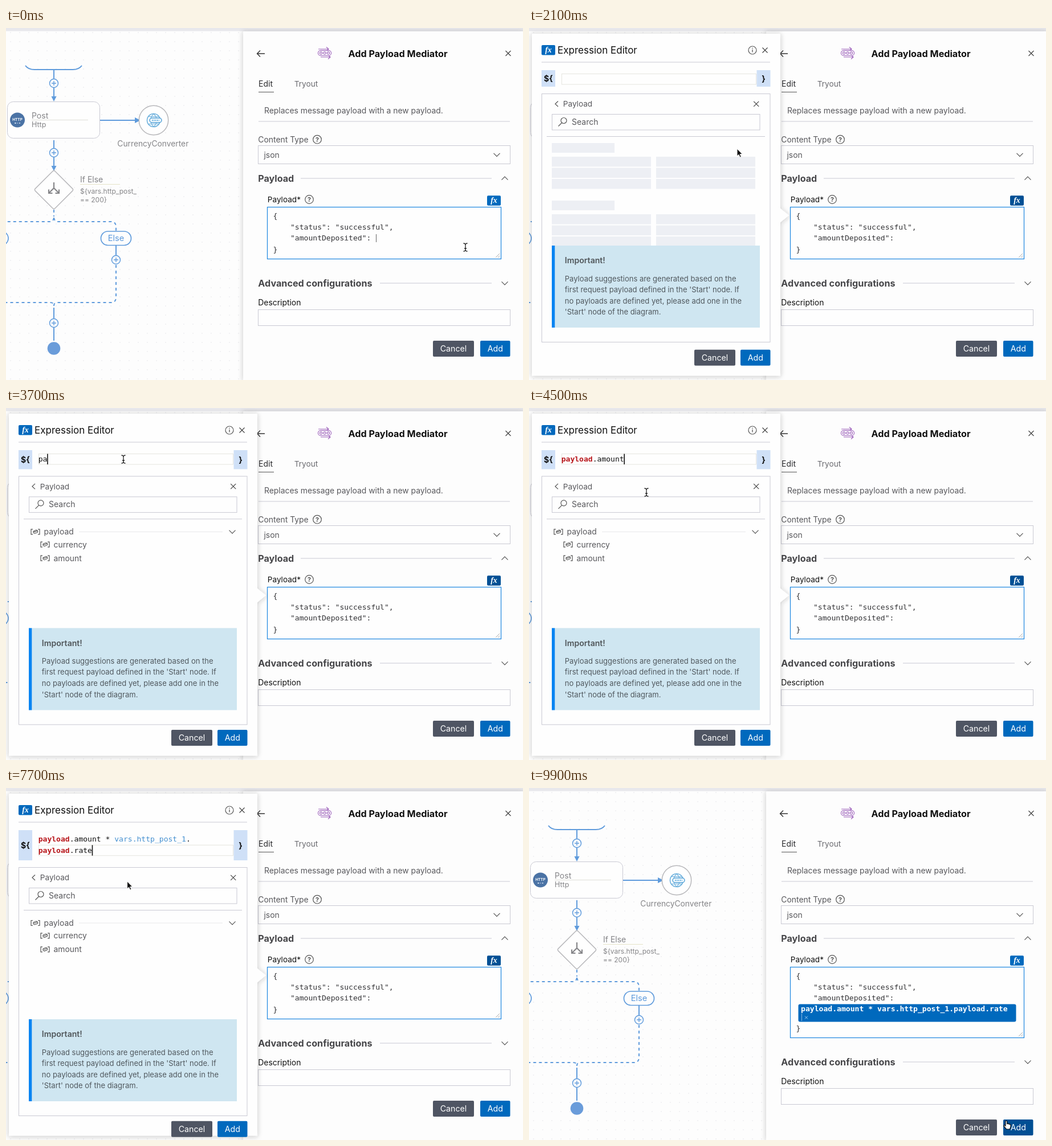
Recreate the animation shown at these times as an HTML page. Size 907 by 618 pixels, loop 10 s.

```html
<!DOCTYPE html>
<html lang="en">
<head>
<meta charset="utf-8">
<title>Payload expression</title>
<style>
html, body { margin: 0; width: 100%; height: 100%; overflow: hidden; background: #fdfdfd; }
svg { display: block; width: 100vw; height: 100vh; }
text { font-family: Inter, "Liberation Sans", sans-serif; white-space: pre; }
.mono { font-family: "DejaVu Sans Mono", "Liberation Mono", monospace; }
.fx { font-family: "Liberation Serif", "Noto Serif", serif; font-style: italic; font-weight: 700; }
</style>
</head>
<body>
<svg id="stage" viewBox="0 0 907 618" preserveAspectRatio="none"></svg>
<script>
const BLUE = '#5f9bdc', GREY = '#858588', BORDER = '#c9c9d3', PRIMARY = '#0069bd', PRESSED = '#004f94';
const LOOP = 10000, STEP = 100;
const EXPRESSION = 'payload.amount * vars.http_post_1.payload.rate';
const FIRST_LINE = 34, MAX_COLUMNS = 43, CHAR = 7.857;

// Drawing helpers
const text = (x, y, s, size = 14, fill = '#58585c', more = '') =>
  `<text x="${x}" y="${y}" font-size="${size}" fill="${fill}" ${more}>${s}</text>`;
const mono = (x, y, s, fill = '#333336', more = '') => text(x, y, s, 13.05, fill, 'class="mono" ' + more);
const path = (d, stroke = '#555', width = 1.2, more = '') =>
  `<path d="${d}" fill="none" stroke="${stroke}" stroke-width="${width}" ${more}/>`;
const rect = (x, y, w, h, fill, more = '') =>
  `<rect x="${x}" y="${y}" width="${w}" height="${h}" fill="${fill}" ${more}/>`;
const box = (x, y, w, h, more = '') => rect(x, y, w, h, '#fefefe', `stroke="${BORDER}" ${more}`);
const circle = (x, y, r, fill, stroke = 'none', width = 1.2) =>
  `<circle cx="${x}" cy="${y}" r="${r}" fill="${fill}" stroke="${stroke}" stroke-width="${width}"/>`;
const group = (id, content, more = '') => `<g id="${id}" ${more}>${content}</g>`;
const cross = (x, y, r = 4.5) => path(`M${x - r} ${y - r}l${2 * r} ${2 * r}m0 ${-2 * r}l${-2 * r} ${2 * r}`, '#444');
const chevron = (x, y, up) => path(`M${x - 5.5} ${y + (up ? 2.7 : -2.7)}l5.5 ${up ? -5.5 : 5.5} 5.5 ${up ? 5.5 : -5.5}`);
const help = (x, y) => circle(x, y, 7.3, 'none', '#555') +
  text(x, y + 4, '?', 11, '#444', 'text-anchor="middle" font-weight="600"');
const fxBadge = (x, y, id) => rect(x, y, 24, 17.5, PRIMARY, `rx="2" id="${id}"`) +
  text(x + 12, y + 13, 'fx', 14, '#fff', 'class="fx" text-anchor="middle"');
const button = (x, y, w, label, fill, id) => rect(x, y, w, 28, fill, `rx="2" id="${id}"`) +
  text(x + w / 2, y + 19.2, label, 14.2, '#fff', 'text-anchor="middle"');

function diagram() {
  const plus = (x, y) => circle(x, y, 7.5, '#fdfdfd', BLUE, 1.5) + path(`M${x - 4} ${y}h8m-4 -4v8`, BLUE, 1.4);
  const arrow = (x, y, d) => `<path d="M${x} ${y}${d}z" fill="${BLUE}"/>`;
  const line = d => path(d, BLUE, 2);
  const dashed = d => path(d, BLUE, 2, 'stroke-dasharray="5 5"');
  const pill = (x, w) => rect(x, 357, w, 24.5, '#fdfdfd', `rx="12.2" stroke="${BLUE}" stroke-width="1.7"`);
  return [
    line('M34 66Q39 73 50 73H117Q128 73 133 66'),
    line('M84 73V122M84 197V244M165 162H228M84 491V549'),
    arrow(84, 129, 'l-4.5 -9h9'), arrow(84, 251, 'l-4.5 -9h9'), arrow(236, 162, 'l-10 -5v10'),
    plus(84, 97), plus(84, 219), plus(84, 518),
    box(2.5, 129.5, 162, 64, 'rx="10"'),
    circle(20, 161.5, 13, '#4b73a5'),
    text(20, 163, 'HTTP', 6.5, '#fff', 'text-anchor="middle" font-weight="700"'),
    path('M15 167h3m2 0h1m2 0h2', '#dbe8f6', 1.5),
    text(45, 158.5, 'Post', 14, GREY), text(45, 174, 'Http', 12.5, GREY),
    path('M45 161.5H144', '#deded8', 1),
    circle(259, 162, 25.7, '#fefefe', '#b7b7ba', 1.5),
    circle(259, 162, 11.5, 'none', '#6eb1dd', 1.6),
    path('M259 150.5Q248 162 259 173.5M259 150.5Q270 162 259 173.5M250 155.5H268M250 168.5H268', '#6eb1dd', 1.2),
    rect(252, 158, 21, 8, '#eef7fc', 'rx="4" stroke="#55a3d8" stroke-width="1.5"'),
    path('M256 162H269', '#82bce2', 2, 'stroke-dasharray="3 1"'),
    text(195.3, 208, 'CurrencyConverter', 13.8, GREY),
    rect(59.5, 259.5, 49, 49, '#fefefe', 'rx="3" stroke="#b9b9bc" stroke-width="1.5" transform="rotate(45 84 284)"'),
    path('M84 271V281L76 289M84 281L92 289M75 283.5V290H81.5M93 283.5V290H86.5', '#87878a', 2.2),
    text(130, 271, 'If Else', 14, GREY), path('M130 274.5H200', '#e6e3c8', 1),
    `<svg x="130" y="278" width="99" height="32">${text(0, 13, '${vars.http_post_', 12, GREY)}${text(0, 28, '== 200}', 12, GREY)}</svg>`,
    dashed('M84 319V331M84 333Q83 340 77 340H0M84 333Q85 340 91 340H184Q193 340 193 349V357'),
    dashed('M193 416V473Q193 482 184 482H90Q84 482 84 488Q84 482 78 482H0'),
    line('M193 382V399'), plus(193, 407),
    pill(-45, 49), pill(166.5, 53),
    text(193, 374.4, 'Else', 14.7, BLUE, 'text-anchor="middle"'),
    circle(84, 562.5, 11.3, '#6a9cda'),
  ].join('');
}

function drawer() {
  const mediatorIcon = path('M548 37H566M562 33.5L566 37L562 40.5M552 51H569M565 47.5L569 51L565 54.5', '#a066bd', 1.2) +
    rect(547.5, 39.3, 23, 9.2, '#fdfdfd', 'rx="4.6" stroke="#a066bd" stroke-width="1.2"') +
    [552.6, 559, 565.4].map(x => circle(x, 44, 2.1, 'none', '#a066bd', 1.1)).join('');
  const chip = rect(472.5, 379.5, 382, 31, PRIMARY, 'rx="3"') +
    text(477, 392, EXPRESSION, 13.1, '#fff', 'class="mono" font-weight="700"') +
    path('M478.5 396V409', '#8fb6de', 1) + path('M484 400.5l5 5m0 -5l-5 5', '#a9cdee', 1);
  return [
    rect(416, 6, 491, 612, '#fdfdfd', 'filter="url(#shadow)"'),
    path('M454 45H441M446 39.5L440.5 45L446 50.5', '#333', 1.4),
    mediatorIcon,
    text(600.5, 50.7, 'Add Payload Mediator', 16.2, '#111', 'font-weight="700"'),
    cross(881, 44.5),
    text(443, 102.5, 'Edit', 14, '#2b2b2e'), text(505.7, 102.5, 'Tryout', 13.7, '#6b6b70'),
    path('M443 112.5H470', '#555', 1),
    text(453, 150, 'Replaces message payload with a new payload.', 13.9),
    path('M443 164H884', BORDER, 1),
    text(442.3, 200.5, 'Content Type', 13.9), help(546, 195.7),
    box(442.5, 206.5, 442, 32), text(452.5, 227.5, 'json', 13.9), chevron(861, 222.5),
    text(442.3, 270, 'Payload', 16.1, '#464649', 'font-weight="700"'),
    path('M517 264H852', BORDER, 1.2), chevron(875, 264, true),
    text(458.8, 306, 'Payload*', 13.6, '#111'), help(532, 301),
    fxBadge(844, 294.3, 'fieldFx'),
    rect(458.5, 314.5, 410, 91, '#fefefe', 'id="field" stroke="#1b85e0" stroke-width="1.2"'),
    mono(468.5, 333.5, '{'), mono(499, 353.7, '"status": "successful",'), mono(499, 373, '"amountDeposited":'),
    path('M649.5 362V376', '#666', 1, 'id="fieldCaret"'),
    group('chip', chip),
    group('lower', [
      mono(468.5, 393, '}'), path('M859 403l7 -7m-3 7l3 -3', '#aaa', 1),
      text(442.3, 454, 'Advanced configurations', 16.2, '#464649', 'font-weight="700"'),
      path('M656 448H852', BORDER, 1.2), chevron(875, 448),
      text(442.3, 487, 'Description', 13.9, '#111'), box(442.5, 494.5, 442, 28),
      button(749, 549, 72, 'Cancel', '#4f5563', 'cancel'), button(832, 549, 52.5, 'Add', PRIMARY, 'add'),
    ].join('')),
  ].join('');
}

function popup() {
  const bars = [202, 303].map(y => rect(40, y, 110, 17, '#d9dee8') + [24, 43.5, 63].map(d =>
    [40, 223].map(x => rect(x, y + d, 174, 17.5, '#d9dee8')).join('')).join('')).join('');
  const leaf = (x, y, label) => path(`M${x + 3} ${y - 4.5}h-3v9h3M${x + 12} ${y - 4.5}h3v9h-3`, '#555', 1.2) +
    path(`M${x + 4} ${y - 1}l5 -2.2 2.5 1.4v2.6l-5 2.2 -2.5 -1.4zl2.5 1.2 5 -2.4`, '#555', 1.1) +
    text(x + 22.5, y + 5, label, 13.9);
  const notice = ['Payload suggestions are generated based on the', "first request payload defined in the 'Start' node. If",
    'no payloads are defined yet, please add one in the', "'Start' node of the diagram."];
  return [
    `<g filter="url(#shadow)">${rect(5, 10, 436, 600.5, '#fefefe')}<path d="M440 316L456 329L440 342z" fill="#fefefe"/></g>`,
    fxBadge(22, 30, 'headFx'),
    text(50, 45.2, 'Expression Editor', 17, '#111'),
    circle(392, 39, 7, 'none', '#555'), path('M392 37.7V42.5M392 34.8V36.3', '#555', 1.3), cross(414, 39),
    path('M22 60H423', BORDER, 1),
    rect(22, 74, 24, 29, '#cfe0f7', 'id="open"'), rect(399.5, 74, 24, 29, '#cfe0f7', 'id="close"'),
    group('braces', text(26, 94, '${', 14, '#111', 'font-weight="700"') + text(408.3, 94, '}', 14, '#111', 'font-weight="700"')),
    rect(57.5, 80.5, 341, 18.5, 'none', 'id="activeLine" stroke="#e5e5df"'),
    mono(56.7, 94, '', '#111', 'id="line0"'), mono(56.7, 113.7, '', '#111', 'id="line1"'),
    path('M0 80.5V99', '#111', 1.6, 'id="caret"'),
    group('panel', [
      box(22.5, 115.5, 400.5, 436), path('M51 128.5L46 133.3L51 138'),
      text(59.8, 138.2, 'Payload', 13.6), cross(398.7, 133.3),
      box(40.5, 151.5, 364.5, 27.5), circle(61, 162.5, 5, 'none', '#555'), path('M57.5 166.5L51.5 172.5', '#555', 1.3),
      text(75, 170, 'Search', 14), path('M31 190.5H414', BORDER, 1),
      group('bars', bars),
      group('tree', leaf(44, 213, 'payload') + path('M128 213H380', '#e8e8ea', 1) + chevron(397, 213) +
        leaf(61, 235.3, 'currency') + leaf(61, 259.3, 'amount')),
      rect(40, 382, 365, 144, '#cfe6f1'), rect(40, 382, 5.3, 144, '#0a84f2'),
      text(62.8, 413.4, 'Important!', 14.1, '#50565a', 'font-weight="600"'),
      ...notice.map((s, i) => text(62.8, 444.5 + i * 19.6, s, 13, '#50585e')),
    ].join('')),
    group('actions',
      button(290, 564.7, 72, 'Cancel', '#4f5563', 'popupCancel') + button(371, 564.7, 52.5, 'Add', PRIMARY, 'popupAdd')),
  ].join('');
}

const pointers = {
  beam: path('M-3.5 -7Q0 -7 0 -4Q0 -7 3.5 -7M0 -5V6M-3.5 7Q0 7 0 4Q0 7 3.5 7M-2 2H2', '#222', 1.3),
  arrow: '<path d="M0 0V13L3 10.3L5.2 15.2L7.4 14.2L5.3 9.5H9.3z" fill="#111" stroke="#fff"/>',
  hand: '<path d="M-2 -6Q-.5 -7.5 .7 -6V-1.5Q2 -2.5 3 -1Q4.5 -2 5.2 -.3Q7 -.8 7 1V4L5.5 8H-.5L-5 2.5Q-5.5 .5 -3.5 1L-2 2.3z" fill="#fff" stroke="#111" stroke-width="1.2"/>',
};

stage.innerHTML = `<defs>
  <filter id="shadow" x="-10%" y="-10%" width="120%" height="120%"><feDropShadow dx="0" dy="1" stdDeviation="4.5" flood-color="#333" flood-opacity=".28"/></filter>
  <pattern id="dots" width="16" height="16" patternUnits="userSpaceOnUse">${circle(8, 8, .7, '#dedee3')}</pattern></defs>` +
  rect(0, 0, 907, 618, '#fdfdfd') + rect(0, 6, 416, 612, 'url(#dots)') + rect(0, 0, 907, 5.5, '#e8e8ec') +
  diagram() + drawer() + group('popup', popup()) +
  group('pointer', Object.keys(pointers).map(k => group(k, pointers[k])).join(''));

const $ = id => document.getElementById(id);
const set = (id, attrs) => { for (const k in attrs) $(id).setAttribute(k, attrs[k]); };
const show = (id, on) => set(id, { visibility: on ? 'inherit' : 'hidden' });
const shift = (id, y) => set(id, { transform: `translate(0 ${y})` });
const progress = (t, from, to) => Math.min(1, Math.max(0, (t - from) / (to - from)));
const ease = p => p * p * (3 - 2 * p);

// Pointer stops: time, x, y
const route = [[0, 806, 385], [200, 806, 385], [700, 857, 304], [1000, 857, 304], [1700, 365, 212], [2900, 365, 212],
  [3300, 206, 90], [3900, 206, 90], [4400, 206, 148], [7600, 206, 148], [8500, 398, 611], [9100, 398, 611], [9800, 838, 591]];

function pointerAt(t) {
  const i = route.findIndex(stop => stop[0] > t);
  if (i < 0) return route[route.length - 1].slice(1);
  const [t0, x0, y0] = route[i - 1], [t1, x1, y1] = route[i];
  const p = ease(progress(t, t0, t1));
  return [x0 + (x1 - x0) * p, y0 + (y1 - y0) * p];
}

const highlight = s => s
  .replace(/payload/g, '<tspan fill="#b8161b" font-weight="700">$&</tspan>')
  .replace(/vars(\.http\w*)?/g, '<tspan fill="#4590d0">$&</tspan>');

function render(t) {
  const isOpen = t >= 1000 && t < 9100, isDone = t >= 9100;
  show('popup', isOpen);
  show('chip', isDone);
  show('fieldCaret', t < 500);
  shift('lower', isDone ? 33 : 0);
  set('field', { height: isDone ? 124 : 91 });
  set('fieldFx', { fill: isOpen || t >= 700 && t < 1000 ? PRESSED : PRIMARY });
  set('add', { fill: t >= 9800 ? PRESSED : PRIMARY });
  set('popupAdd', { fill: t >= 8400 ? PRESSED : PRIMARY });

  const typed = Math.floor(14 * progress(t, 3500, 4500) + 32 * progress(t, 4600, 6400));
  const wrapped = typed > MAX_COLUMNS;
  const entry = EXPRESSION.slice(0, typed);
  const lines = wrapped ? [entry.slice(0, FIRST_LINE), entry.slice(FIRST_LINE)] : [entry, ''];
  lines.forEach((s, i) => { $('line' + i).innerHTML = highlight(s); });
  const row = wrapped ? 1 : 0, grow = wrapped ? 24 : typed ? 4.4 : 0;
  set('open', { height: 29 + grow });
  set('close', { height: 29 + grow });
  shift('braces', grow / 2);
  shift('panel', grow);
  shift('actions', Math.max(0, grow - 4));
  shift('activeLine', row * 19.7);
  set('caret', { transform: `translate(${57.2 + lines[row].length * CHAR} ${row * 19.7})` });
  show('caret', t >= 3300 && (t < 6500 || (t - 6500) % 1000 < 500));

  const loaded = t >= 3300;
  show('bars', !loaded);
  show('tree', loaded);
  set('bars', { opacity: .72 - .28 * Math.cos((t - 2100) / 800 * Math.PI) });

  const [x, y] = pointerAt(t);
  const kind = t < 500 || t >= 3200 && t < 7700 ? 'beam' : t >= 700 && t < 1100 || t >= 8400 && t < 9200 || t >= 9700 ? 'hand' : 'arrow';
  for (const k in pointers) show(k, k === kind);
  set('pointer', { transform: `translate(${x} ${y})` });
  show('pointer', t < 4600 || t >= 7600);
}

const start = performance.now();
function tick() {
  const t = (performance.now() - start) % LOOP;
  render(Math.floor(t / STEP) * STEP);
  requestAnimationFrame(tick);
}
tick();
</script>
</body>
</html>
```
